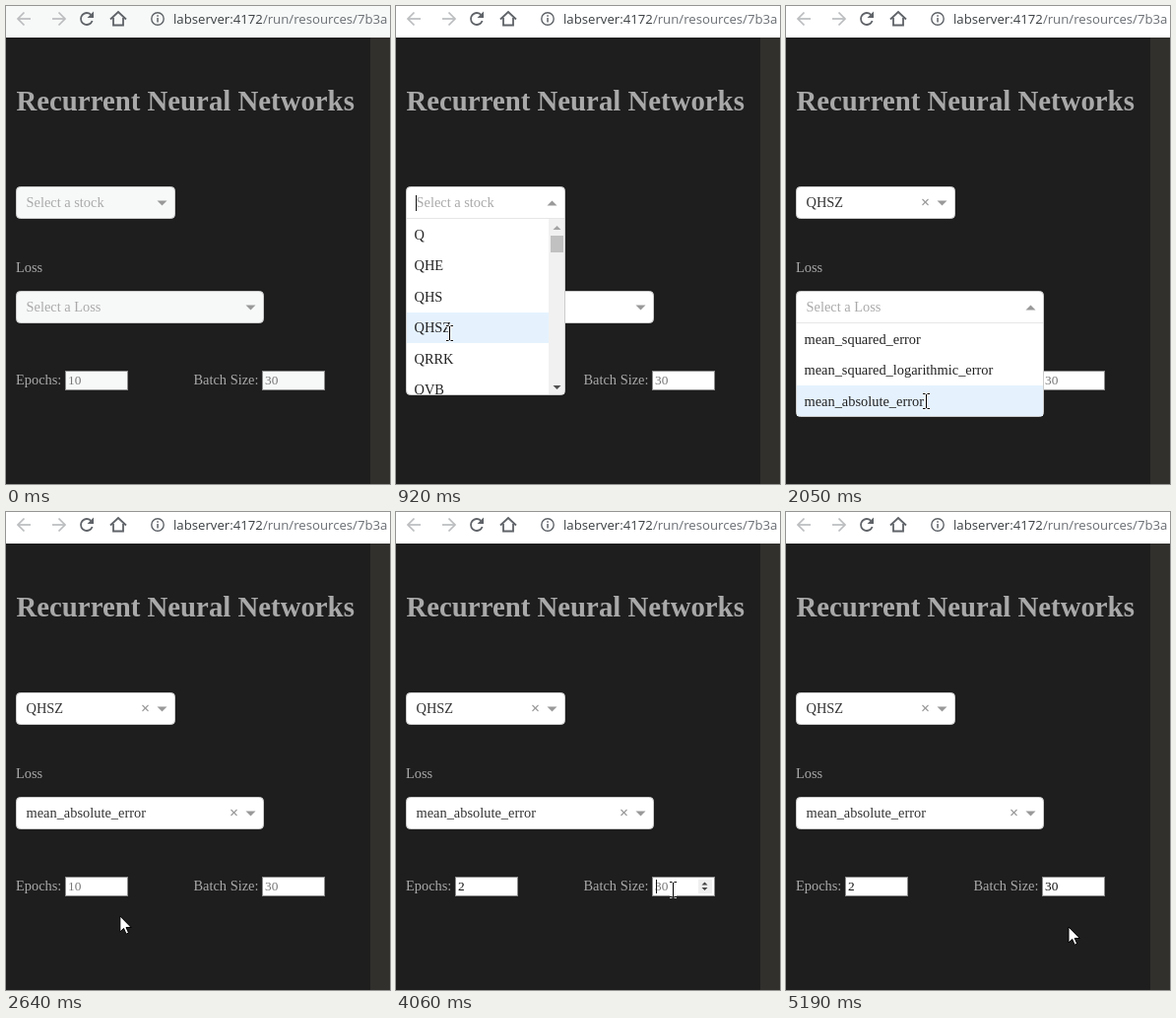
Recreate the animation shown at these times as an HTML page with a canvas. Size 390 by 485 pixels, loop 5530 ms.

```html
<!DOCTYPE html>
<html lang="en">
<head>
<meta charset="utf-8">
<title>Training form</title>
<style>
  html, body { margin: 0; width: 100%; height: 100%; overflow: hidden; background: #1e1e1e; }
  canvas { display: block; width: 390px; height: 485px; }
</style>
</head>
<body>
<canvas id="stage" width="390" height="485"></canvas>
<script>
const LOOP = 5530;
const ctx = document.getElementById('stage').getContext('2d');
const SERIF = '"Liberation Serif", "Times New Roman", serif';
const BODY = '14.4px ' + SERIF;
const FIELD = '13.33px ' + SERIF;
const ROW = 31.5;

const STOCKS = ['Q', 'QHE', 'QHS', 'QHSZ', 'QRRK', 'QVB'];
const LOSSES = ['mean_squared_error', 'mean_squared_logarithmic_error', 'mean_absolute_error'];

// Times of the user's actions, in ms
const AT = {
  enter: 350, openStock: 640, pickStock: 1110, openLoss: 1570, pickLoss: 2230,
  focusEpochs: 3230, typeEpochs: 3370, focusBatch: 4060, typeThree: 4200, typeZero: 4330, blur: 5190
};

// Pointer moves: start, end, number of steps, destination
const START = [368, 292];
const MOVES = [
  [350, 600, 5, 96, 200],
  [700, 920, 5, 54, 332],
  [1150, 1390, 6, 248, 307],
  [1750, 2050, 8, 142, 401],
  [2270, 2770, 11, 110, 412],
  [2810, 3040, 5, 95, 386],
  [3560, 4020, 11, 281, 383],
  [4510, 4590, 3, 284, 390],
  [4730, 5150, 9, 287, 421]
];

const stockBox = { x: 10, y: 183, w: 162, h: 33 };
const lossBox = { x: 10, y: 289, w: 252, h: 33 };
const epochsBox = { x: 60, y: 370, w: 64, h: 20 };
const batchBox = { x: 260, y: 370, w: 64, h: 20 };

const ease = p => p * p * (3 - 2 * p);
const inside = (p, b) => p.x >= b.x && p.x < b.x + b.w && p.y >= b.y && p.y < b.y + b.h;

function pointerAt(t) {
  let [x, y] = START;
  for (const [from, to, steps, tx, ty] of MOVES) {
    if (t < from) break;
    const step = Math.floor((t - from) / (to - from) * (steps - 1) + 1e-6) + 1;
    const p = ease(Math.min(1, step / steps));
    x += (tx - x) * p;
    y += (ty - y) * p;
  }
  return { x, y };
}

function rect(x, y, w, h, color) {
  ctx.fillStyle = color;
  ctx.fillRect(x, y, w, h);
}

function text(str, x, y, color, font = BODY) {
  ctx.font = font;
  ctx.fillStyle = color;
  ctx.fillText(str, x, y);
}

function line(points, color, width = 1) {
  ctx.beginPath();
  points.forEach(([x, y], i) => i ? ctx.lineTo(x, y) : ctx.moveTo(x, y));
  ctx.strokeStyle = color;
  ctx.lineWidth = width;
  ctx.stroke();
}

// dir 1 points down, -1 points up
function triangle(x, y, half, height, dir, color) {
  ctx.beginPath();
  ctx.moveTo(x - half, y - dir * height / 2);
  ctx.lineTo(x + half, y - dir * height / 2);
  ctx.lineTo(x, y + dir * height / 2);
  ctx.fillStyle = color;
  ctx.fill();
}

function roundBox(x, y, w, h, radii, fill, border) {
  ctx.beginPath();
  ctx.roundRect(x + 0.5, y + 0.5, w - 1, h - 1, radii);
  ctx.fillStyle = fill;
  ctx.fill();
  ctx.strokeStyle = border;
  ctx.lineWidth = 1;
  ctx.stroke();
}

function toolbar(paper) {
  const dim = '#babcbe', ink = '#5f6368';
  rect(0, 0, 390, 32, paper);
  line([[25, 13], [12, 13]], dim, 1.7);
  line([[18.5, 6.5], [12, 13], [18.5, 19.5]], dim, 1.7);
  line([[47, 13], [60, 13]], dim, 1.7);
  line([[53.5, 6.5], [60, 13], [53.5, 19.5]], dim, 1.7);

  ctx.beginPath();
  ctx.arc(82, 13, 6, 0.35, 5.5);
  ctx.strokeStyle = ink;
  ctx.lineWidth = 1.8;
  ctx.stroke();
  ctx.beginPath();
  ctx.moveTo(89, 5.5);
  ctx.lineTo(89, 12);
  ctx.lineTo(82.5, 12);
  ctx.fillStyle = ink;
  ctx.fill();

  line([[106, 13.5], [114, 6], [122, 13.5]], ink, 1.8);
  line([[109, 12], [109, 19.5], [119, 19.5], [119, 12]], ink, 1.8);

  ctx.beginPath();
  ctx.arc(154, 13, 6.2, 0, Math.PI * 2);
  ctx.strokeStyle = ink;
  ctx.lineWidth = 1.4;
  ctx.stroke();
  rect(153.3, 12, 1.5, 4.5, ink);
  rect(153.3, 9.2, 1.5, 1.6, ink);

  const font = '13.2px "Open Sans", "Noto Sans", sans-serif';
  const host = 'labserver:4172';
  text(host, 170, 18, '#3c4043', font);
  text('/run/resources/7b3a', 170 + ctx.measureText(host).width, 18, '#6a6e73', font);
}

function select(box, hint, value, open, paper) {
  const { x, y, w, h } = box;
  const mid = y + 17;
  roundBox(x, y, w, h, open ? [4, 4, 0, 0] : 4, paper, '#ccc');
  text(value || hint, x + 10.5, y + 21, value ? '#333' : '#aaa');
  triangle(x + w - 13.5, mid, 5, 5, open ? -1 : 1, '#999');
  if (value) {
    const cx = x + w - 30.5, cy = y + 16;
    line([[cx - 3, cy - 3], [cx + 3, cy + 3]], '#999', 1.1);
    line([[cx + 3, cy - 3], [cx - 3, cy + 3]], '#999', 1.1);
  }
}

function menu(box, options, height, pointer, scroll) {
  const { x, w } = box;
  const top = box.y + box.h;
  const hover = Math.max(0, Math.floor((pointer.y - top) / ROW));
  roundBox(x, top - 1, w, height + 1, [0, 0, 4, 4], '#fff', '#ccc');
  rect(x + 1, top - 1, w - 2, 1, '#e6e6e6');
  ctx.save();
  ctx.beginPath();
  ctx.rect(x + 1, top, w - 2, height - 1);
  ctx.clip();
  options.forEach((name, i) => {
    const y = top + i * ROW;
    if (i === hover) rect(x + 1, Math.round(y), w - 2, 31, '#e5f2fe');
    text(name, x + 8.5, Math.round(y + 20.6), '#222');
  });
  if (scroll) {
    const sx = x + w - 17;
    rect(sx, top, 16, height, '#f1f1f1');
    rect(sx + 2, top + 17, 13, 17, '#c1c1c1');
    triangle(sx + 8.5, top + 9, 4, 4, -1, '#a3a3a3');
    triangle(sx + 8.5, top + height - 8, 4, 4, 1, '#505050');
  }
  ctx.restore();
}

function numberField(box, value, typed, focused, pointer, paper) {
  const { x, y, w, h } = box;
  rect(x, y, w, h, '#8d8d8d');
  rect(x + 1, y + 1, w - 2, h - 2, paper);
  text(value, x + 3, y + 14, typed ? '#111' : '#777', FIELD);
  if (focused || inside(pointer, box)) {
    rect(x + 47, y + 3, 14, 14, '#efefef');
    triangle(x + 53.5, y + 7, 3, 3, -1, '#444');
    triangle(x + 53.5, y + 12.5, 3, 3, 1, '#444');
  }
}

function caret(x, y, h) {
  rect(x, y, 1, h, '#111');
}

function arrowCursor({ x, y }) {
  const shape = [[0, 0], [0, 16], [3.7, 12.5], [6.2, 18.2], [8.7, 17.1], [6.2, 11.5], [11.3, 11.5]];
  ctx.beginPath();
  shape.forEach(([dx, dy]) => ctx.lineTo(x + dx, y + dy));
  ctx.closePath();
  ctx.fillStyle = '#fff';
  ctx.fill();
  ctx.strokeStyle = '#000';
  ctx.lineWidth = 1;
  ctx.stroke();
}

function beamCursor({ x, y }) {
  const cx = Math.round(x) + 0.5, cy = Math.round(y);
  for (const [color, width] of [['#fff', 2.6], ['#000', 1]]) {
    line([[cx, cy - 7], [cx, cy + 7]], color, width);
    for (const s of [-1, 1]) {
      line([[cx - 3.5, cy + s * 7.5], [cx - 1, cy + s * 7.5]], color, width);
      line([[cx + 1, cy + s * 7.5], [cx + 3.5, cy + s * 7.5]], color, width);
    }
  }
}

function handCursor({ x, y }) {
  ctx.save();
  ctx.translate(x, y);
  ctx.beginPath();
  ctx.moveTo(-2, 2);
  ctx.quadraticCurveTo(0, -1.5, 2, 2);
  ctx.lineTo(2, 8);
  ctx.quadraticCurveTo(4.2, 6, 5.5, 8.6);
  ctx.quadraticCurveTo(7.6, 7, 8.8, 9.6);
  ctx.quadraticCurveTo(11.5, 8.6, 11.5, 12);
  ctx.lineTo(11.5, 16);
  ctx.lineTo(9.2, 20);
  ctx.lineTo(9.2, 23);
  ctx.lineTo(0, 23);
  ctx.lineTo(0, 20.5);
  ctx.lineTo(-6, 13.5);
  ctx.quadraticCurveTo(-6, 10.5, -2, 13.5);
  ctx.closePath();
  ctx.fillStyle = '#fff';
  ctx.fill();
  ctx.strokeStyle = '#000';
  ctx.lineWidth = 1.2;
  ctx.stroke();
  for (const dx of [2, 5.5, 8.8]) line([[dx, 8.5], [dx, 12.5]], '#000', 1);
  ctx.restore();
}

function draw(t) {
  const between = (a, b) => t >= a && t < b;
  const started = t >= AT.enter;
  const pointer = started ? pointerAt(t) : { x: -50, y: -50 };
  const paper = started ? '#fff' : '#f7f9f8';
  const stockOpen = between(AT.openStock, AT.pickStock);
  const lossOpen = between(AT.openLoss, AT.pickLoss);
  const epochsFocus = between(AT.focusEpochs, AT.focusBatch);
  const batchFocus = between(AT.focusBatch, AT.blur);
  const epochsTyped = t >= AT.typeEpochs;
  const batchTyped = t >= AT.typeThree;
  const label = '#a9a9a9';

  rect(0, 0, 390, 485, '#1e1e1e');
  rect(370, 32, 20, 453, '#32302d');
  toolbar(paper);

  text('Recurrent Neural Networks', 10.5, 106, label, 'bold 28.8px ' + SERIF);
  select(stockBox, 'Select a stock', t >= AT.pickStock && STOCKS[3], stockOpen, paper);
  text('Loss', 10, 270, label);
  select(lossBox, 'Select a Loss', t >= AT.pickLoss && LOSSES[2], lossOpen, paper);
  text('Epochs:', 10, 384, label);
  numberField(epochsBox, epochsTyped ? '2' : '10', epochsTyped, epochsFocus, pointer, paper);
  text('Batch Size:', 190.5, 384, label);
  const batch = between(AT.typeThree, AT.typeZero) ? '3' : '30';
  numberField(batchBox, batch, batchTyped, batchFocus, pointer, paper);

  if (stockOpen) {
    menu(stockBox, STOCKS, 179, pointer, true);
    caret(20, 192, 16);
  }
  if (lossOpen) menu(lossBox, LOSSES, 95, pointer, false);
  if (epochsFocus && !epochsTyped) caret(63, 373, 14);
  if (batchFocus && !batchTyped) caret(264, 373, 14);

  if (!started) return;
  const below = (b, h) => ({ x: b.x, y: b.y + b.h, w: b.w, h });
  const overText = inside(pointer, epochsBox) || inside(pointer, batchBox)
    || stockOpen && inside(pointer, below(stockBox, 179))
    || lossOpen && inside(pointer, below(lossBox, 95));
  if (overText) beamCursor(pointer);
  else if (inside(pointer, stockBox) || inside(pointer, lossBox)) handCursor(pointer);
  else arrowCursor(pointer);
}

function tick() {
  draw(performance.now() % LOOP);
  requestAnimationFrame(tick);
}
tick();
</script>
</body>
</html>
```
